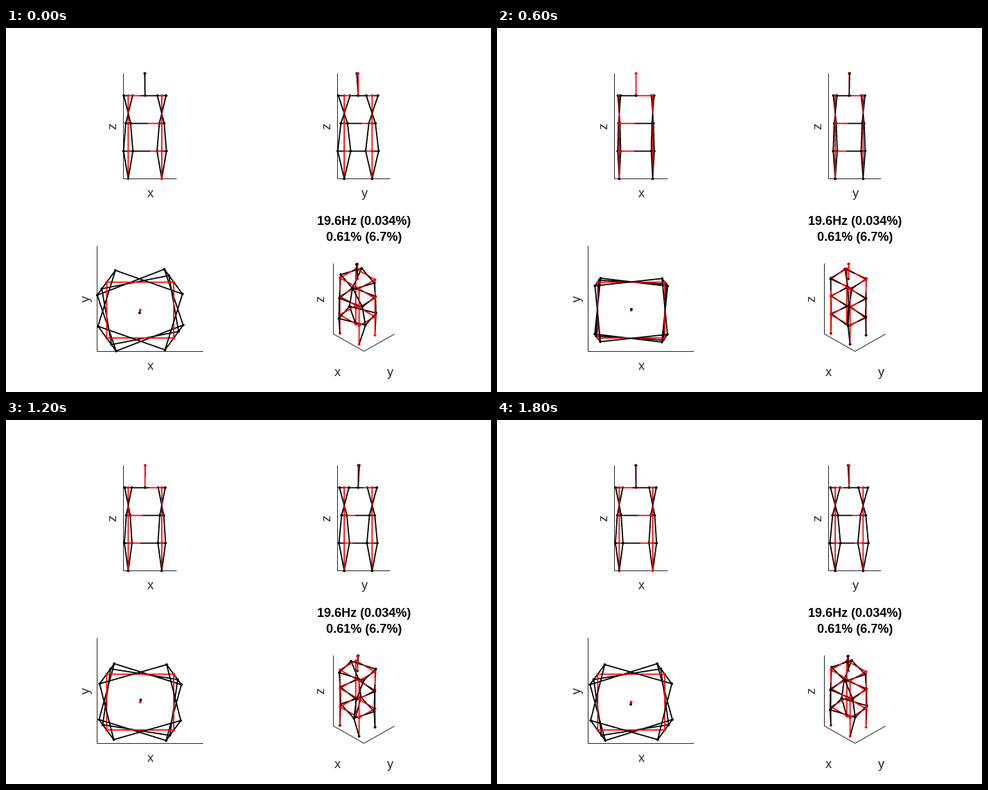
A matplotlib script for the animation above (2 s loop, 700x525 px).

```python
import numpy as np
import matplotlib.pyplot as plt
from matplotlib.animation import FuncAnimation

W, H, DPI = 700, 525, 100
PT = 72 / DPI                  # points per pixel
FRAMES, INTERVAL = 10, 200
SUB = 4                        # subpixels per pixel
SAMPLES = 300                  # brush marks along a bar
BAR, DOT = 1.67, 3.8
INK = "0.15"
RED, BLACK = 1, 2

# Tower geometry: centre, half sizes and storey heights
CENTRE = np.array([62.2, 59.6])
HALF = np.array([48.4, 40.3])
HEIGHTS = [0, 80, 160, 240]
MAST_TOP = 304
CORNERS = [(-1, -1), (1, -1), (1, 1), (-1, 1)]

# Twist of each storey in x and y, sway of the mast tip, slight drift of all
TWIST = [(0, 0), (13.6, 18.7), (7, 9.5), (-12.6, -17)]
SWAY = (-0.8, -4, 0)
DRIFT = (0, 0.01, 0)


def build_nodes():
    rest, mode = [], []
    for z, (a, b) in zip(HEIGHTS, TWIST):
        for sx, sy in CORNERS:
            rest.append((*(CENTRE + HALF * (sx, sy)), z))
            mode.append((-a * sy, b * sx, 0))
    rest += [(*CENTRE, HEIGHTS[-1]), (*CENTRE, MAST_TOP)]
    mode += [(0, 0, 0), SWAY]
    return np.array(rest, float), np.array(mode, float) + DRIFT


def build_bars():
    bars = [(16, 17)]
    for level in range(1, 4):
        for k in range(4):
            node = 4 * level + k
            bars.append((node - 4, node))
            bars.append((node, 4 * level + (k + 1) % 4))
    return np.array(bars)


def build_brush():
    r = BAR * SUB / 2
    grid = np.arange(-int(r), int(r) + 1)
    dx, dy = (g.ravel() for g in np.meshgrid(grid, grid))
    inside = dx**2 + dy**2 <= r**2
    return dx[inside], dy[inside]


REST, MODE = build_nodes()
BARS = build_bars()
BRUSH_X, BRUSH_Y = build_brush()

# A dot is a ring of brush marks around its node
ANGLES = np.arange(12) * np.pi / 6
RING = (DOT - BAR) / 2 * np.c_[np.cos(ANGLES), np.sin(ANGLES)]
RING = np.vstack([RING, (0, 0)])
SHIFT = np.vstack([np.zeros((len(BARS) * SAMPLES, 2)),
                   np.tile(RING, (len(REST), 1))])
SHIFT_X, SHIFT_Y = np.tile(SHIFT, (2, 1)).T
PEN = np.repeat([RED, BLACK], len(SHIFT)).astype(np.uint8)


# Each view returns screen x, screen y and nearness to the viewer
def front(x, y, z):
    return 169.5 + x / 2, 217.5 - z / 2, -y


def side(x, y, z):
    return 478.5 + y / 2, 217.5 - z / 2, x


def top(x, y, z):
    return 131.5 + x, 466.5 - y, z


def isometric(x, y, z):
    return 472.5 + 0.2855 * (x + y), 441.3 + 0.1625 * (x - y) - z / 3, x - y + z


VIEWS = [front, side, top, isometric]


def brush_marks(nodes):
    t = np.linspace(0, 1, SAMPLES)[None, :, None]
    a, b = nodes[BARS[:, 0]][:, None], nodes[BARS[:, 1]][:, None]
    along = (a + (b - a) * t).reshape(-1, 3)
    return np.vstack([along, np.repeat(nodes, len(RING), axis=0)])


def render(phase):
    """Both towers in all views, nearer marks hiding farther ones."""
    marks = np.vstack([brush_marks(REST), brush_marks(REST + phase * MODE)])
    cells = np.zeros((H * SUB, W * SUB), np.uint8)
    for view in VIEWS:
        x, y, near = view(*marks.T)
        order = np.argsort(near, kind="stable")
        col = np.floor((x + SHIFT_X) * SUB).astype(int)[order, None] + BRUSH_X
        row = np.floor((y + SHIFT_Y) * SUB).astype(int)[order, None] + BRUSH_Y
        cells[row, col] = PEN[order, None]
    blocks = cells.reshape(H, SUB, W, SUB)
    red, black = ((blocks == pen).mean(axis=(1, 3)) for pen in (RED, BLACK))
    image = np.zeros((H, W, 4))
    image[..., 3] = red + black
    image[..., 0] = red / np.maximum(red + black, 1e-9)
    return image


fig = plt.figure(figsize=(W / DPI, H / DPI), dpi=DPI, facecolor="white")
ax = fig.add_axes([0, 0, 1, 1])
ax.axis("off")
picture = ax.imshow(render(1), extent=(0, W, H, 0), aspect="auto",
                    interpolation="nearest", zorder=3)
ax.set_xlim(0, W)
ax.set_ylim(H, 0)


def axis_lines(*points):
    ax.plot(*zip(*points), color=INK, lw=PT, snap=False,
            solid_joinstyle="miter", solid_capstyle="projecting")


def label(x, y, text, **style):
    ax.text(x, y, text, family="Liberation Sans",
            ha="center", va="baseline", rotation_mode="anchor",
            **{"color": INK, "fontsize": 18.33 * PT, **style})


axis_lines((169.5, 66), (169.5, 217.5), (246, 217.5))
axis_lines((478.5, 66), (478.5, 217.5), (554, 217.5))
axis_lines((131.5, 315), (131.5, 466.5), (284, 466.5))
axis_lines((472.5, 340), (472.5, 441.3), (516.7, 466.3), (560.3, 441.7))

for x, y, text in [(208.5, 244, "x"), (517.5, 244, "y"), (208.5, 493, "x"),
                   (478.5, 502, "x"), (554.5, 502, "y")]:
    label(x, y, text)
for x, y, text in [(159, 141, "z"), (468, 141, "z"),
                   (121, 390, "y"), (459, 390, "z")]:
    label(x, y, text, rotation=90)
for y, text in [(284, "19.6Hz (0.034%)"), (307, "0.61% (6.7%)")]:
    label(516.5, y, text, weight="bold", color="black", fontsize=18 * PT)


def update(frame):
    picture.set_data(render(np.cos(2 * np.pi * frame / FRAMES)))
    return [picture]


anim = FuncAnimation(fig, update, frames=FRAMES, interval=INTERVAL,
                     repeat=True, repeat_delay=0, blit=False)
plt.show()
```
